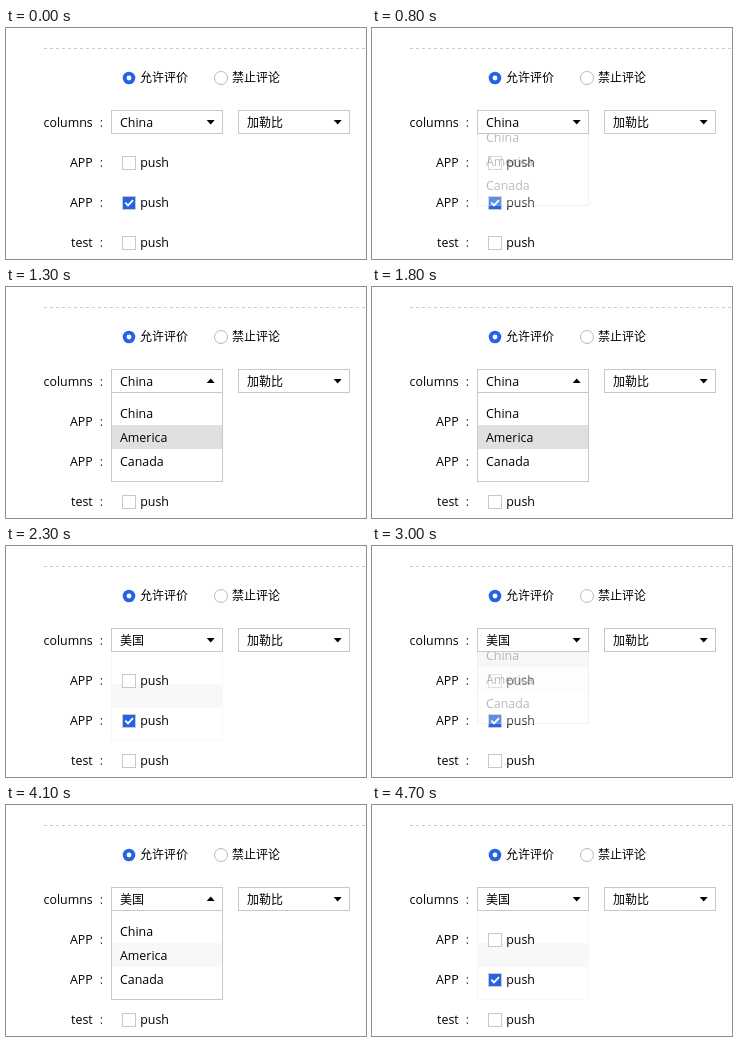
An HTML page with a canvas for the animation above (6800 ms loop, 360 by 231 pixels).

```html
<!DOCTYPE html>
<html lang="zh-CN">
<head>
<meta charset="utf-8">
<title>Form select</title>
<style>
html, body { margin: 0; width: 100%; height: 100%; overflow: hidden; background: #fff; }
canvas { display: block; }
</style>
</head>
<body>
<canvas id="stage" width="360" height="231"></canvas>
<script>
const ctx = document.getElementById('stage').getContext('2d');
const LOOP = 6800, STEP = 100, DURATION = 300, SLIDE = 24;
const BLUE = '#2463e2', BORDER = '#c8c8c8', HOVER = '#e0e0e0', FAINT = '#f8f8f8';
const LATIN = '12.4px "Open Sans", "Noto Sans", sans-serif';
const CJK = '12px "Noto Sans CJK SC", "Noto Sans CJK", sans-serif';
const OPTIONS = ['China', 'America', 'Canada'];

// Start of each slide in and slide out of the menu.
const VISITS = [{ open: 770, close: 2090 }, { open: 2970, close: 4490 }];

function text(str, x, midY, align = 'left', color = '#000') {
  ctx.font = /[\u4e00-\u9fff]/.test(str) ? CJK : LATIN;
  ctx.textAlign = align;
  ctx.fillStyle = color;
  ctx.fillText(str, x, midY + 4.5);
}

function rect(x, y, w, h, fill, stroke) {
  if (fill) {
    ctx.fillStyle = fill;
    ctx.fillRect(x, y, w, h);
  }
  if (stroke) {
    ctx.strokeStyle = stroke;
    ctx.lineWidth = 1;
    ctx.strokeRect(x + 0.5, y + 0.5, w - 1, h - 1);
  }
}

function disc(x, y, r, fill, stroke) {
  ctx.beginPath();
  ctx.arc(x, y, r, 0, Math.PI * 2);
  ctx.fillStyle = fill;
  ctx.fill();
  if (stroke) {
    ctx.strokeStyle = stroke;
    ctx.lineWidth = 1;
    ctx.stroke();
  }
}

function radio(x, label, on) {
  if (on) {
    disc(x, 50, 6.3, BLUE);
    disc(x, 50, 2.4, '#fff');
  } else {
    disc(x, 50, 6.5, '#fff', '#bbb');
  }
  text(label, x + 11, 49.5);
}

function label(str, y) {
  text(str, 86.7, y, 'right');
  text(':', 95.5, y, 'center', '#234');
}

function checkbox(y, on) {
  rect(116, y - 6.5, 14, 14, on ? BLUE : '#fff', BORDER);
  if (on) {
    ctx.beginPath();
    ctx.moveTo(119.3, y + 0.2);
    ctx.lineTo(122, y + 2.9);
    ctx.lineTo(127, y - 2.4);
    ctx.strokeStyle = '#fff';
    ctx.lineWidth = 1.8;
    ctx.stroke();
  }
  text('push', 134.2, y);
}

function select(x, value, isOpen) {
  rect(x, 82, 112, 24, '#fff', BORDER);
  text(value, x + 9, 94.5);
  ctx.save();
  ctx.translate(x + 99.7, 94);
  if (isOpen) ctx.scale(1, -1);
  ctx.beginPath();
  ctx.moveTo(-4, -2);
  ctx.lineTo(4, -2);
  ctx.lineTo(0, 2.4);
  ctx.fillStyle = '#000';
  ctx.fill();
  ctx.restore();
}

function menu(open, fills) {
  ctx.save();
  ctx.globalAlpha = open;
  ctx.translate(0, Math.round(105 - SLIDE * (1 - open)));
  rect(105, 0, 112, 90, '#fff', BORDER);
  OPTIONS.forEach((name, i) => {
    if (fills[i]) rect(106, 9 + i * 24, 110, 24, fills[i]);
    text(name, 114, 21.5 + i * 24);
  });
  ctx.restore();
}

function easeOut(x) {
  const c = Math.min(1, Math.max(0, x));
  return 1 - (1 - c) ** 3;
}

function openness(t) {
  const s = VISITS.reduce((sum, v) =>
    sum + easeOut((t - v.open) / DURATION) - easeOut((t - v.close) / DURATION), 0);
  return s > 0.95 ? 1 : s < 0.05 ? 0 : s;
}

function rowFills(t) {
  if (t < 1300) return [];
  if (t < 3000) return [null, HOVER];
  if (t < 4100) return [HOVER, FAINT];
  return [null, t < 4500 ? FAINT : HOVER];
}

// Pale trace left where the menu was.
function trace() {
  rect(105, 105, 112, 90, null, FAINT);
  rect(106, 138, 110, 24, FAINT);
}

function draw(t) {
  const open = openness(t);
  rect(0, 0, 360, 231, '#fff');

  ctx.setLineDash([3, 3]);
  ctx.strokeStyle = '#ccc';
  ctx.lineWidth = 1;
  ctx.beginPath();
  ctx.moveTo(38, 20.5);
  ctx.lineTo(360, 20.5);
  ctx.stroke();
  ctx.setLineDash([]);

  radio(123, '允许评价', true);
  radio(215, '禁止评论', false);

  if (!open && t >= 2300) trace();
  ['columns', 'APP', 'APP', 'test'].forEach((name, i) => label(name, 94.5 + i * 40));
  [false, true, false].forEach((on, i) => checkbox(134.5 + i * 40, on));

  if (open) menu(open, rowFills(t));
  select(105, t < 2200 ? 'China' : '美国', open > 0.5);
  select(232, '加勒比', false);
}

const start = performance.now();
function tick() {
  const t = (performance.now() - start) % LOOP;
  draw(Math.floor(t / STEP) * STEP);
  requestAnimationFrame(tick);
}
tick();
</script>
</body>
</html>
```
